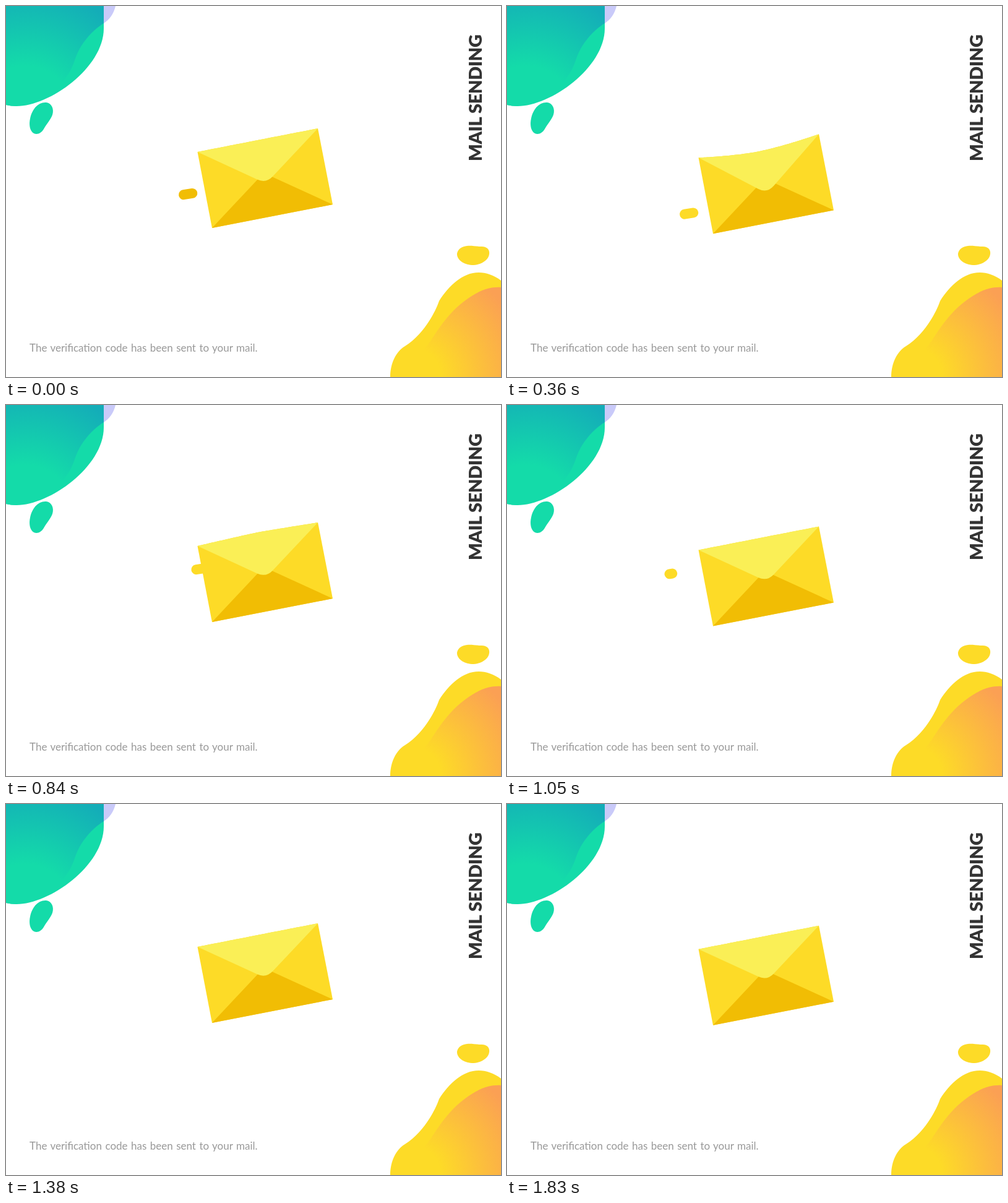
Recreate the animation shown at these times as an HTML page. Size 800x600 px, loop 1860 ms.

```html
<!DOCTYPE html>
<html lang="en">
<head>
<meta charset="utf-8">
<title>Mail sending</title>
<style>
  html, body { margin: 0; width: 100%; height: 100%; overflow: hidden; background: #fff; }
  svg { display: block; width: 800px; height: 600px; }
  text { font-family: Lato, "Open Sans", sans-serif; }
  .title { font-size: 29px; font-weight: 900; letter-spacing: -.3px; fill: #333; }
  .note { font-size: 17px; fill: #999; word-spacing: 1.1px; }
</style>
</head>
<body>
<svg viewBox="0 0 800 600">
  <defs>
    <radialGradient id="sea" gradientUnits="userSpaceOnUse" cx="30" cy="175" r="205">
      <stop offset=".38" stop-color="#14dba9"/>
      <stop offset="1" stop-color="#14adb8"/>
    </radialGradient>
    <radialGradient id="sun" gradientUnits="userSpaceOnUse" cx="655" cy="600" r="190">
      <stop offset=".25" stop-color="#fddb27"/>
      <stop offset="1" stop-color="#fba054"/>
    </radialGradient>
    <clipPath id="tealClip">
      <path id="teal" d="M0 0H158V36C158 100 70 162 17 162Q8 162 0 160Z"/>
    </clipPath>
  </defs>

  <path fill="#c9caf9" d="M150 0H177C174 13 167 22 158 28L150 33Z"/>
  <use href="#teal" fill="#14dba9"/>
  <path clip-path="url(#tealClip)" fill="url(#sea)"
    d="M0 0H177C174 13 167 22 158 28C138 40 120 62 112 85C106 104 98 116 85 130L0 170Z"/>
  <path fill="#14dba9"
    d="M65 156C74 157 78 167 75 176C72 184 66 190 61 199C56 207 50 208 45 206C38 202 37 191 39 182C42 167 52 155 65 156Z"/>

  <path fill="#fddb27"
    d="M745 388C752 387 760 389 769 389C777 389 782 394 781 401C780 411 768 419 753 419C738 418 728 409 729 400C731 392 737 389 745 388Z"/>
  <path fill="#fddb27"
    d="M800 444C788 435 776 431 764 431C738 431 716 452 700 477C692 500 672 533 645 550C630 559 621 578 621 600H800Z"/>
  <path fill="url(#sun)"
    d="M800 455C775 453 750 468 729 487C712 503 700 520 686 542C675 558 664 570 650 585L640 600H800Z"/>

  <g id="streaks" fill="none" stroke-width="16" stroke-linecap="round"></g>
  <g id="envelope">
    <path id="body" fill="#fddb27"/>
    <path fill="#f1bd04" d="M333 359L416.5 270L528 321Z"/>
    <path id="flap" fill="#faef56"/>
  </g>

  <text class="title" transform="translate(768.5 251) rotate(-90)">MAIL SENDING</text>
  <text class="note" x="38" y="559">The verification code has been sent to your mail.</text>
</svg>

<script>
const LOOP = 1860, STEP = 30;
const $ = id => document.getElementById(id);
const clamp = p => Math.min(1, Math.max(0, p));
const ease = p => (1 - Math.cos(Math.PI * clamp(p))) / 2;
const mix = (a, b, p) => a + (b - a) * p;

// Keys are [time, value] pairs joined by a sine ease.
function track(keys, t) {
  let value = keys[0][1];
  for (let i = 1; i < keys.length; i++) {
    const [t0] = keys[i - 1], [t1, v1] = keys[i];
    value = mix(value, v1, ease((t - t0) / (t1 - t0)));
  }
  return value;
}

const LIFT = [[-300, -8.5], [320, 9.6], [780, -8.5], [1150, 0], [1560, -8.5], [2180, 9.6]];
const SAG = [[0, 0], [380, 9], [820, -3], [1050, 0]];
const TIP = [[0, 0], [380, 7], [720, 0]];

const STREAKS = [
  { start: -292, y: 304, color: "#f1bd04" },
  { start: 68, y: 335.5, color: "#fddb27" },
  { start: 617, y: 268.2, color: "#fddb27" }
].map(streak => {
  const path = document.createElementNS("http://www.w3.org/2000/svg", "path");
  path.setAttribute("stroke", streak.color);
  $("streaks").append(path);
  return { ...streak, path };
});

function drawStreak({ start, y, path }, t) {
  const duration = 455, delay = 49;
  const point = time => {
    const x = mix(350, 262, ease((time - start) / duration));
    return `${x} ${y - .16 * (x - 294.5)}`;
  };
  const visible = t > start && t < start + duration + delay;
  path.setAttribute("d", visible ? `M${point(t)}L${point(t - delay)}` : "");
}

function drawEnvelope(t) {
  const sag = track(SAG, t);
  const handle = Math.abs(sag) * 4.5;
  const midY = 217 + sag;
  const tipX = 420.3, tipY = 287 + track(TIP, t);
  const near = (x, y) => `${mix(x, tipX, .87)} ${mix(y, tipY, .87)}`;
  const top = `M309.5 236C309.5 236 ${406.5 - handle} ${midY + handle * .195} 406.5 ${midY}` +
    `C${406.5 + handle} ${midY - handle * .195} 504 198 504 198`;

  $("envelope").setAttribute("transform", `translate(0 ${track(LIFT, t)})`);
  $("body").setAttribute("d", `${top}L528 321L333 359Z`);
  $("flap").setAttribute("d", `${top}L${near(504, 198)}Q${tipX} ${tipY} ${near(309.5, 236)}Z`);
}

const begin = performance.now();
function render() {
  const elapsed = (performance.now() - begin) % LOOP;
  const t = Math.floor(elapsed / STEP) * STEP;
  STREAKS.forEach(streak => drawStreak(streak, t));
  drawEnvelope(t);
  requestAnimationFrame(render);
}
render();
</script>
</body>
</html>
```
